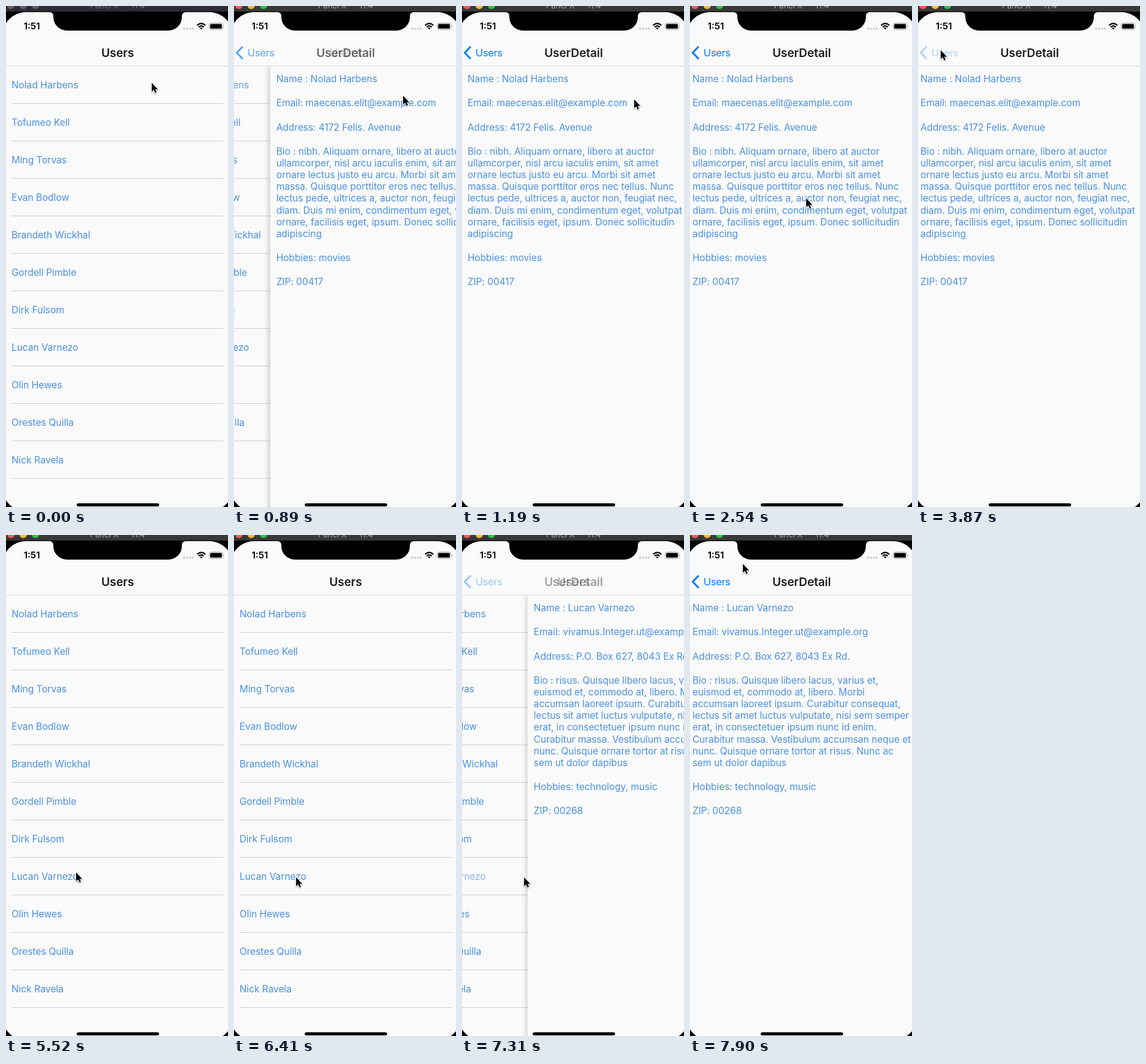
An HTML page that plays this animation: 361x815 px, repeating every 8 s.

```html
<!DOCTYPE html>
<html lang="en">
<head>
<meta charset="utf-8">
<title>Users</title>
<style>
html, body { margin: 0; width: 100%; height: 100%; overflow: hidden; background: #000; }
#stage { position: absolute; left: 0; top: 0; width: 361px; height: 815px; overflow: hidden; background: #000; font-family: Inter, "Liberation Sans", sans-serif; }
#stage div, #stage svg { position: absolute; }
#bar { left: 0; top: 0; width: 361px; height: 9px; overflow: hidden; background: #2c2c32; color: #737377; }
#bar.on { background: #383838; color: #a6a6a6; }
#bar i { position: absolute; top: -7px; width: 12px; height: 12px; border-radius: 50%; background: #626266; }
#bar.on i:nth-child(1) { background: #fc5b57; }
#bar.on i:nth-child(2) { background: #fdbc2e; }
#bar.on i:nth-child(3) { background: #28c840; }
#bar div { left: 1px; width: 361px; top: -11px; text-align: center; font-size: 13px; line-height: 20px; }
#screen { left: -6px; top: 10px; width: 375px; height: 812px; border-radius: 39px; overflow: hidden; background: #fafafa; }
.page { left: 0; top: 88px; width: 375px; height: 724px; background: #fafafa; color: #4a90e2; font-size: 15.5px; letter-spacing: -.07px; white-space: pre; }
.row { left: 15px; width: 345px; height: 60px; line-height: 61px; border-bottom: 1px solid #cfcfd0; }
#detail p { margin: 0 0 20.25px 10px; line-height: 19.1px; }
#detail p:first-child { margin-top: 11px; }
#head { left: 0; top: 0; width: 375px; height: 87px; background: #fafafa; border-bottom: 1px solid #dadadb; }
.title { left: 0; top: 51.6px; width: 375px; text-align: center; font-size: 19px; font-weight: 600; line-height: 30px; letter-spacing: -.1px; color: #1c1c1c; }
#back { left: 0; top: 51px; width: 90px; height: 30px; color: #007aff; font-size: 16.5px; line-height: 30px; letter-spacing: -.4px; }
#back span { position: absolute; left: 28px; }
#clock { left: 18px; top: 13px; width: 60px; text-align: center; font-size: 15px; line-height: 20px; font-weight: 600; }
#cursor { filter: drop-shadow(0 1px 1px rgba(0, 0, 0, .35)); }
</style>
</head>
<body>
<div id="stage">
  <div id="bar"><i style="left:2px"></i><i style="left:22px"></i><i style="left:42px"></i><div>Panel X — 11.4</div></div>
  <div id="screen">
    <div id="list" class="page"></div>
    <div id="detail" class="page"></div>
    <div id="head">
      <div id="back"><svg width="24" height="30"><path d="M20 5 10.500 15 20 25" fill="none" stroke="#007aff" stroke-width="3"/></svg><span>Users</span></div>
      <div id="t1" class="title">Users</div>
      <div id="t2" class="title">UserDetail</div>
      <div id="clock">1:51</div>
    </div>
  </div>
  <svg width="361" height="815" style="left:0;top:0">
    <path d="M71 9V10A6 6 0 0 1 77 16V18A22 22 0 0 0 99 40H264A22 22 0 0 0 286 18V16A6 6 0 0 1 292 10V9Z"/>
    <rect x="115" y="809" width="134" height="5" rx="2.500"/>
    <g fill="#c9c9ca"><circle cx="289.700" cy="37" r="1.700"/><circle cx="294.300" cy="37" r="1.700"/><circle cx="298.900" cy="37" r="1.700"/><circle cx="303.500" cy="37" r="1.700"/></g>
    <g fill="none" stroke="#000" stroke-width="2.200"><path d="M310.800 31.500Q317.500 25.300 324.200 31.500"/><path d="M313.300 34.200Q317.500 30.400 321.700 34.200"/></g>
    <path d="M315.200 35.800Q317.500 34 319.800 35.800L317.500 38.300Z"/>
    <rect x="330.500" y="27.800" width="22" height="10.500" rx="2.800" fill="none" stroke="#999"/>
    <rect x="332" y="29.300" width="19" height="7.500" rx="1.500"/>
    <path d="M354 31.300Q356 33 354 34.800Z" fill="#999"/>
    <path id="cursor" d="M0 0V14.300L3.300 11.300 5.500 16.300 7.800 15.300 5.700 10.500H10Z" stroke="#fff" stroke-width="1.600" paint-order="stroke"/>
  </svg>
</div>
<script>
const $ = id => document.getElementById(id);
const LOOP = 8000, STEP = 149.06, W = 375, RATE = 8.6;

const names = ["Nolad Harbens", "Tofumeo Kell", "Ming Torvas", "Evan Bodlow", "Brandeth Wickhal",
  "Gordell Pimble", "Dirk Fulsom", "Lucan Varnezo", "Olin Hewes", "Orestes Quilla", "Nick Ravela"];

const users = [
  ["Name : " + names[0], "Email: maecenas.elit@example.com", "Address: 4172 Felis. Avenue",
`Bio : nibh. Aliquam ornare, libero at auctor
ullamcorper, nisl arcu iaculis enim, sit amet
ornare lectus justo eu arcu. Morbi sit amet
massa. Quisque porttitor eros nec tellus. Nunc
lectus pede, ultrices a, auctor non, feugiat nec,
diam. Duis mi enim, condimentum eget, volutpat
ornare, facilisis eget, ipsum. Donec sollicitudin
adipiscing`, "Hobbies: movies", "ZIP: 00417"],
  ["Name : " + names[7], "Email: vivamus.Integer.ut@example.org", "Address: P.O. Box 627, 8043 Ex Rd.",
`Bio : risus. Quisque libero lacus, varius et,
euismod et, commodo at, libero. Morbi
accumsan laoreet ipsum. Curabitur consequat,
lectus sit amet luctus vulputate, nisi sem semper
erat, in consectetuer ipsum nunc id enim.
Curabitur massa. Vestibulum accumsan neque et
nunc. Quisque ornare tortor at risus. Nunc ac
sem ut dolor dapibus`, "Hobbies: technology, music", "ZIP: 00268"]
];

const rows = names.map((name, i) => {
  const row = document.createElement("div"), label = document.createElement("span");
  row.className = "row";
  row.style.top = i * 61 + "px";
  label.textContent = name;
  row.append(label);
  $("list").append(row);
  return label;
});

// Pointer path: [step, x, y]
const path = [[0, 237, 125], [2, 256, 130], [4, 270, 140], [8, 280, 152], [11, 280, 152], [12, 297, 143],
  [14, 272, 196], [17, 189, 313], [19, 187, 360], [21, 150, 245], [24, 37, 72], [26, 37, 72], [27, 48, 104],
  [28, 77, 197], [30, 120, 400], [32, 149, 540], [33, 121, 541], [34, 141, 546], [36, 141, 546],
  [37, 114, 549], [40, 67, 563], [43, 101, 557], [49, 101, 557], [51, 88, 270], [53, 86, 47]];

function pointer(n) {
  const i = Math.max(1, path.findIndex(k => k[0] >= n));
  const [a, ax, ay] = path[i - 1], [b, bx, by] = path[i];
  const u = (n - a) / (b - a);
  return [ax + (bx - ax) * u, ay + (by - ay) * u];
}

// Overdamped spring, 0 to 1
function settle(t, start) {
  if (t < start) return 0;
  const rest = Math.exp(-RATE * (t - start) / 1000);
  return rest < .002 ? 1 : 1 - rest;
}

function press(t, down, up) {
  return t < down ? 1 : t < up ? .2 : Math.min(1, .2 + .8 * (t - up) / 250);
}

let shown = -1;
function showUser(i) {
  if (i === shown) return;
  shown = i;
  $("detail").replaceChildren(...users[i].map(text => {
    const p = document.createElement("p");
    p.textContent = text;
    return p;
  }));
}

function draw(ms) {
  const n = Math.min(53, Math.floor((ms + 6) / STEP)), t = n * STEP;
  const p = settle(t, 690) - settle(t, 3955) + settle(t, 7164);
  const [x, y] = pointer(n);
  showUser(n < 40 ? 0 : 1);
  $("bar").className = t > 440 ? "on" : "";
  $("list").style.transform = `translateX(${-.3 * W * p}px)`;
  $("detail").style.transform = `translateX(${W * (1 - p)}px)`;
  $("detail").style.visibility = p > 0 ? "visible" : "hidden";
  $("detail").style.boxShadow = `0 0 10px rgba(0,0,0,${.4 * p})`;
  $("t1").style.opacity = 1 - p;
  const fresh = Math.max(0, 2 * p - 1);
  $("t2").style.opacity = fresh;
  $("back").style.opacity = fresh * (t > 3870 && t < 4100 ? .3 : 1);
  rows[0].style.opacity = press(t, 440, 690);
  rows[7].style.opacity = press(t, 7000, 7164);
  $("cursor").setAttribute("transform", `translate(${x} ${y})`);
}

const begin = performance.now();
function tick() {
  draw((performance.now() - begin) % LOOP);
  requestAnimationFrame(tick);
}
tick();
</script>
</body>
</html>
```
